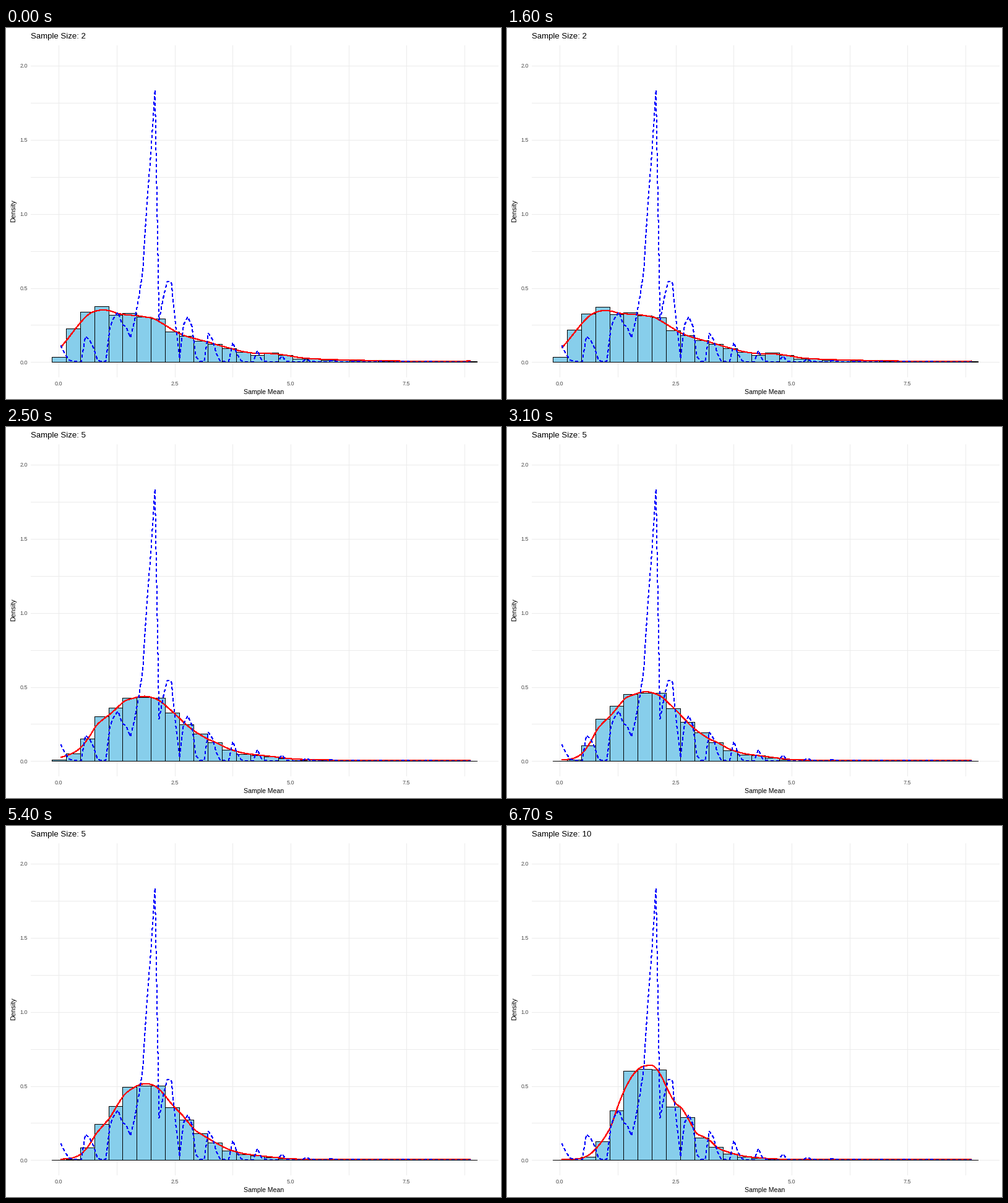
Animation, 800 px wide and 600 px high, one loop 8 s. Source, as a matplotlib script:

```python
import numpy as np
import matplotlib.pyplot as plt
from matplotlib.animation import FuncAnimation
from matplotlib.patches import Rectangle

W, H, DPI = 800, 600, 100
PX = 72 / DPI            # one pixel in points
BASE = 539               # pixel row of density zero
X0, X_UNIT, Y_UNIT = 84.3, 74.92, 239.4
BIN = 22.9
STEPS = 22               # frames in one transition
STARTS = (11, 45)        # frame before each transition begins
SIZES = (2, 5, 10)
GREY = "#EBEBEB"

plt.rcParams["font.family"] = "Liberation Sans"


def smooth(px, py, x):
    """Cubic Hermite curve through the points, never below zero."""
    slope = np.gradient(py, px)
    k = np.clip(np.searchsorted(px, x, side="right") - 1, 0, len(px) - 2)
    d = px[k + 1] - px[k]
    t = np.clip((x - px[k]) / d, 0, 1)
    y = ((1 + 2 * t) * (1 - t) ** 2 * py[k] + t * (1 - t) ** 2 * d * slope[k]
         + t * t * (3 - 2 * t) * py[k + 1] + t * t * (t - 1) * d * slope[k + 1])
    return np.maximum(y, 0)


def heights(text, n):
    row = np.zeros(n)
    values = [float(v) for v in text.split()]
    row[:len(values)] = values
    return row


# Histogram heights in pixels, one row per sample size
bars = [heights(text, 30) for text in (
    "8 54 81 90 76 79 73 70 49 42 34 29 22 16 11 15 11 5 5 3 3 2 2 1 1 1 0 0 1 1",
    "0 1.6 25 68 89 108 110 110 85 63 46 30 17 10 9 5 2 .4 1.4",
    "0 0 5 30 80 144 147 146 86 69 36 21 10 5 3 1 .4",
)]
edges = np.round(72.95 + BIN * np.arange(31))

# Density estimate every half bin; its tail follows the smoothed bars
heads = [heights(text, 22) for text in (
    "23 37 52 66 77 82 83.5 82 78 76 75 74 72 70 64 57 50 44 40 37 34 31",
    "1 2 5 13 29 50 63 74 88 101 106 110 111.5 109 104 94 83 71 59 49 41 34",
    "0 0 1 3 9 20 35 56 89 116 136 148 152 151 136 112 92 82 63 43 37 30",
)]
knots = np.r_[88 + BIN / 2 * np.arange(22), 84.4 + BIN * np.arange(11, 30)]
curve_x = np.linspace(88, 750, 332)
curves = []
for head, bar in zip(heads, bars):
    tail = np.convolve(np.r_[bar, bar[-1]], [0.25, 0.5, 0.25], "same")[11:30]
    curves.append(smooth(knots, np.r_[head, tail], curve_x))

# Normal density whose spread cycles through the sample sizes
theory_x = np.linspace(88, 750, 101)
sd = 2 / np.sqrt(np.resize([2, 5, 10, 30, 50, 100], 101))
z = ((theory_x - X0) / X_UNIT - 2) / sd
theory = Y_UNIT * np.exp(-z * z / 2) / (sd * np.sqrt(2 * np.pi))

fig = plt.figure(figsize=(W / DPI, H / DPI), dpi=DPI, facecolor="white")
ax = fig.add_axes([0, 0, 1, 1])
ax.set_xlim(-0.5, W - 0.5)
ax.set_ylim(H - 0.5, -0.5)
ax.axis("off")


def line(x, y, color, z, width=1.0, **style):
    return ax.plot(x, y, color=color, lw=width * PX, zorder=z,
                   antialiased=False, solid_capstyle="butt", **style)[0]


def label(x, y, text, size, color="black", **style):
    style = {"ha": "center", "va": "baseline", **style}
    return ax.text(x, y, text, fontsize=size * PX, color=color, **style)


# Grid and axis text
for k in range(9):
    row = round(BASE + 0.2 - Y_UNIT / 4 * k)
    line([39, 794], [row, row], GREY, 1)
    if k % 2 == 0:
        label(34.5, row + 4, f"{k / 4:.1f}", 9, "#4D4D4D", ha="right")
for k in range(8):
    col = round(X0 + X_UNIT * 1.25 * k)
    line([col, col], [27, 563], GREY, 1)
    if k % 2 == 0:
        label(col, 577, f"{k * 1.25:.1f}", 9, "#4D4D4D")
label(416, 591, "Sample Mean", 10.5)
label(12, 295.5, "Density", 11, rotation=90, va="center")
title = label(39, 17, "", 13.2, ha="left")

rects = [ax.add_patch(Rectangle((a, BASE), b - a, 0, facecolor="#87CEEB",
                                edgecolor="black", lw=PX, antialiased=False,
                                snap=True, joinstyle="miter", zorder=2))
         for a, b in zip(edges, edges[1:])]
density = line(curve_x, BASE - curves[0], "red", 3, 1.1)
line(theory_x, BASE - theory, "blue", 4, 1.1, dashes=(4, 4),
     dash_capstyle="butt")
line([edges[0], edges[-1] + 0.5], [BASE, BASE], "black", 5)


def cubic_in_out(t):
    return 4 * t ** 3 if t < 0.5 else 1 - 4 * (1 - t) ** 3


def draw(i):
    state = 0 if i <= STARTS[1] else 1
    t = np.clip((i - STARTS[state]) / STEPS, 0, 1)
    e = cubic_in_out(t)

    def mix(rows):
        return rows[state] * (1 - e) + rows[state + 1] * e

    for rect, h in zip(rects, np.round(mix(bars))):
        rect.set_y(BASE - h)
        rect.set_height(h)
    density.set_ydata(BASE - mix(curves))
    title.set_text(f"Sample Size: {SIZES[state + int(t >= 0.5)]}")
    return [*rects, density, title]


anim = FuncAnimation(fig, draw, frames=80, interval=100, repeat=True,
                     repeat_delay=0, blit=False)
plt.show()
```
